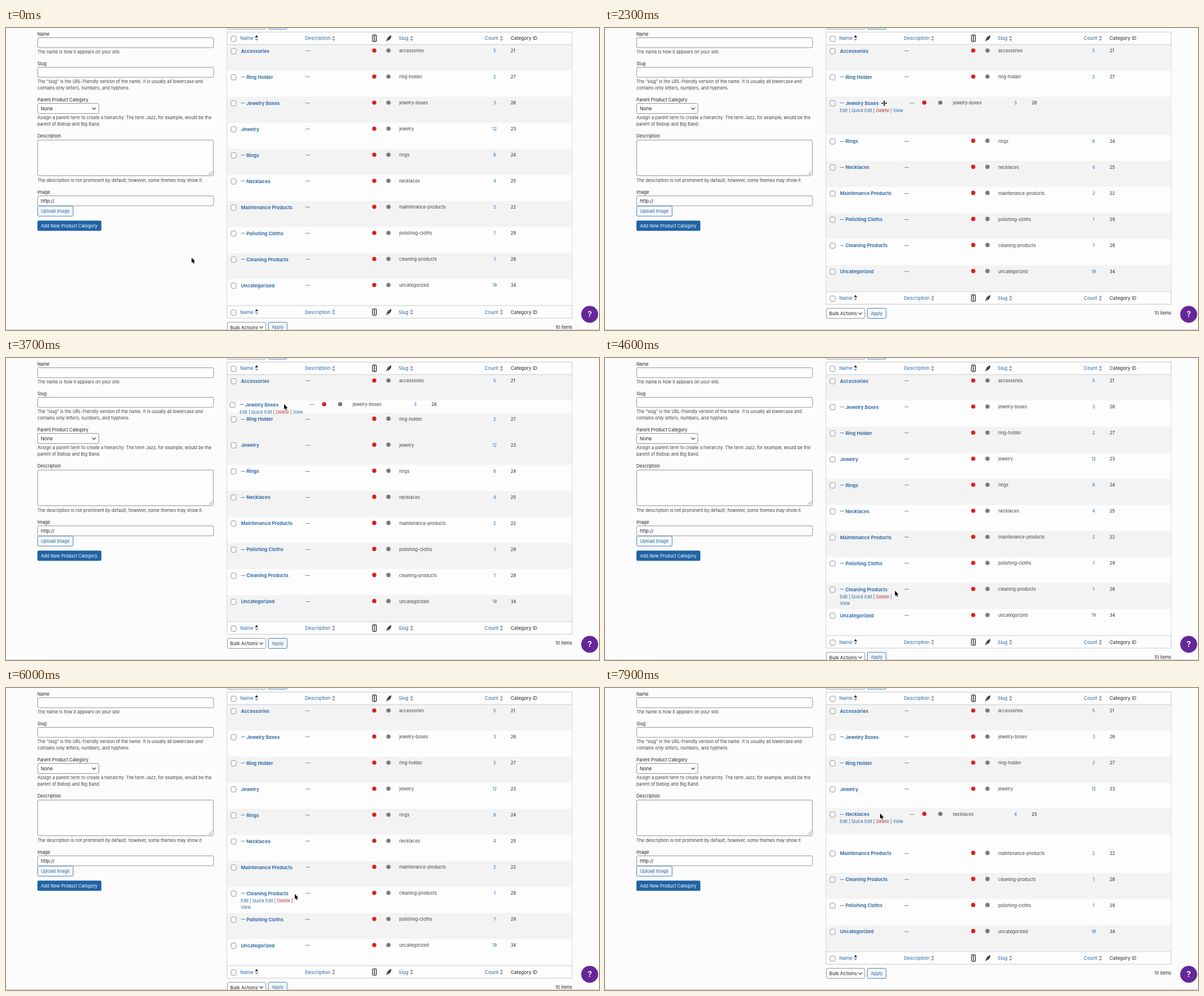
Animation, 1000 px wide and 510 px high, one loop 8 s. Source, as an HTML page:

```html
<!DOCTYPE html>
<html lang="en">
<head>
<meta charset="utf-8">
<title>Category ordering</title>
<style>
html, body { margin: 0; width: 100%; height: 100%; overflow: hidden; background: #fcfcfc; }
svg { display: block; width: 1000px; height: 510px; }
text { font: 7.35px Inter, "Open Sans", sans-serif; fill: #414143; white-space: pre; }
.big { font-size: 8px; }
.bold { font-size: 8px; font-weight: 600; fill: #215f9f; }
.dash { font-size: 6.8px; }
.link { fill: #2468a8; }
.dark { fill: #202022; }
.del { fill: #b03232; }
.mid { text-anchor: middle; }
.end { text-anchor: end; }
.box { fill: #fefefe; stroke: #8c8d94; stroke-width: .9; }
.btn { fill: #f6f7f8; stroke: #3a78b0; stroke-width: .9; }
</style>
</head>
<body>
<svg viewBox="0 0 1000 510" xmlns="http://www.w3.org/2000/svg">
  <g id="form"></g>
  <g id="table"></g>
  <g id="help">
    <circle cx="984.3" cy="483.5" r="14.3" fill="#63279a"/>
    <text x="984.3" y="488.4" class="mid" style="font-size:13.5px;font-weight:600;fill:#fff">?</text>
  </g>
  <g id="pointer"></g>
</svg>
<script>
const LOOP = 8000, STEP = 100, LAG = 90;
const TOP = 28, ROW = 44, GAP = 20.4;
const STRIPE = '#f3f3f4', PLAIN = '#fdfdfd', EDGE = '#c6c7ce', INK = '#1c1c1e';

// name, slug, count, id, is child
const items = [
  ['Accessories', 'accessories', 5, 21, 0],
  ['Ring Holder', 'ring-holder', 2, 27, 1],
  ['Jewelry Boxes', 'jewelry-boxes', 3, 26, 1],
  ['Jewelry', 'jewelry', 12, 23, 0],
  ['Rings', 'rings', 8, 24, 1],
  ['Necklaces', 'necklaces', 4, 25, 1],
  ['Maintenance Products', 'maintenance-products', 2, 22, 0],
  ['Polishing Cloths', 'polishing-cloths', 1, 29, 1],
  ['Cleaning Products', 'cleaning-products', 1, 28, 1],
  ['Uncategorized', 'uncategorized', 19, 34, 0]
];

// Each drag lifts the row at a position and drops it one place higher.
const drags = [
  { at: 2, from: 2300, to: 3800 },
  { at: 8, from: 4900, to: 5700 },
  { at: 5, from: 6850, to: 9000 }
];

// time, x, y
const path = [
  [0, 313, 389], [500, 313, 389], [1200, 430, 153], [1500, 430, 153],
  [2000, 471, 127], [2300, 471, 127], [3000, 469, 79], [3900, 469, 79],
  [4500, 489, 394], [4900, 489, 394], [5400, 487, 349], [6200, 487, 349],
  [6700, 464, 258.5], [6900, 464, 258.5], [7800, 464, 213], [8000, 464, 213]
];

const fixedCols = { dash: 505, red: 621, grey: 645, slug: 663, count: 824, id: 851 };
const dragCols = { dash: 514, red: 538.5, grey: 565.5, slug: 586.5, count: 692, id: 719.5 };

const put = (id, html) => { document.getElementById(id).innerHTML = html; };
const text = (x, y, s, cls = '') => `<text x="${x}" y="${y}" class="${cls}">${s}</text>`;
const rect = (x, y, w, h, attrs) => `<rect x="${x}" y="${y}" width="${w}" height="${h}" ${attrs}/>`;
const box = (x, y, w, h, cls = 'box', r = 2) => rect(x, y, w, h, `rx="${r}" class="${cls}"`);
const dot = (x, y, r, fill) => `<circle cx="${x}" cy="${y}" r="${r}" fill="${fill}"/>`;
const line = (d, color, w = 1) => `<path d="${d}" fill="none" stroke="${color}" stroke-width="${w}"/>`;
const check = y => box(379.5, y - 4.5, 8.6, 9, 'box', 2.2);
const chevron = (x, y) => line(`M${x - 3} ${y - 1.5}l3 3 3-3`, '#424246', 1.2);

function drawForm() {
  const labels = [[12.7, 'Name'], [62.5, 'Slug'], [123.7, 'Parent Product Category'],
    [184.7, 'Description'], [279.9, 'Image']];
  const hints = [
    [43.3, 'The name is how it appears on your site.'],
    [93.2, 'The “slug” is the URL-friendly version of the name. It is usually all lowercase and'],
    [104.2, 'contains only letters, numbers, and hyphens.'],
    [154.2, 'Assign a parent term to create a hierarchy. The term Jazz, for example, would be the'],
    [165.1, 'parent of Bebop and Big Band.'],
    [260.3, 'The description is not prominent by default; however, some themes may show it.']
  ];
  put('form',
    labels.map(([y, s]) => text(53, y, s, 'dark')).join('') +
    hints.map(([y, s]) => text(53, y, s)).join('') +
    box(53.4, 16.4, 296.6, 16.8) + box(53.4, 66.4, 296.6, 16.8) +
    box(53.4, 127.4, 103.2, 17) + text(58.8, 139, 'None', 'big dark') + chevron(148.5, 136) +
    box(53.4, 189.2, 296.2, 60.3) + line('M341.5 248l6.5-6.5M345 248l3-3', '#6c6c70', .8) +
    box(53.4, 283.5, 296.6, 16.7) + text(58.8, 295, 'http://', 'big dark') +
    box(53.4, 300.8, 59.8, 17, 'btn') + text(59, 312.2, 'Upload Image', 'link') +
    rect(53, 325.3, 107.8, 17.2, 'rx="2" fill="#2063a5"') +
    `<text x="59" y="336.8" style="fill:#fff">Add New Product Category</text>` +
    line('M0 509.5H1000', '#d0d0d4'));
}

const sorter = (x, y, up = '#9a9aa0') =>
  `<path d="M${x - 2.7} ${y - 1}l2.7-3.8 2.7 3.8z" fill="${up}"/>` +
  `<path d="M${x - 2.7} ${y + 1}l2.7 3.8 2.7-3.8z" fill="#9a9aa0"/>`;

function heading(y) {
  const base = y + 2.8;
  return check(y + .8) +
    text(395, base, 'Name', 'big link') + sorter(422.5, y - .6, INK) +
    text(504, base, 'Description', 'big link') + sorter(552.5, y) +
    rect(618, y - 5.6, 6.6, 11, `rx="1.6" fill="none" stroke="${INK}" stroke-width="1.1"`) +
    [-3, 0, 3].map(d => dot(621.3, y + d - .1, 1.1, INK)).join('') +
    `<path d="M641.3 ${y + 5.3}c.6-4 2.6-8.6 8.3-10.3 .2 3.6-1.8 7.6-6 8.4z" fill="${INK}"/>` +
    line(`M642.5 ${y + 3.5}q2.5-4.2 5.4-6.3`, '#fff', .7) +
    text(662, base, 'Slug', 'big link') + sorter(684, y) +
    text(830, base, 'Count', 'big link end') + sorter(835.5, y) +
    text(851, base, 'Category ID', 'big dark');
}

function actions(y, oneLine) {
  const bar = x => text(x, y, '|');
  return text(396, y, 'Edit', 'link') + bar(411) + text(415.5, y, 'Quick Edit', 'link') +
    bar(452.6) + text(457, y, 'Delete', 'del') + bar(481.6) +
    (oneLine ? text(485.8, y, 'View', 'link') : text(396, y + 11.2, 'View', 'link'));
}

function rowContent(item, y, cols, hover) {
  const [name, slug, count, id, child] = item;
  const base = y + 13.2;
  return check(y + 11.2) +
    (child ? text(396.2, base, '—', 'bold dash') : '') +
    text(child ? 405.4 : 396.2, y + 13.6, name, 'bold') +
    text(cols.dash, base, '—') +
    dot(cols.red, y + 10, 3.6, '#d92222') + dot(cols.grey, y + 10, 3.6, '#7a7a7c') +
    text(cols.slug, base, slug) + text(cols.count, base, count, 'link mid') +
    text(cols.id, base, id, 'dark') +
    (hover ? actions(y + 25.9, cols === dragCols) : '');
}

const ease = p => p * p * (3 - 2 * p);

function cursorAt(t) {
  const i = Math.max(1, path.findIndex(k => k[0] >= t));
  const [t0, x0, y0] = path[i - 1], [t1, x1, y1] = path[i];
  const p = ease((t - t0) / (t1 - t0));
  return { x: x0 + (x1 - x0) * p, y: y0 + (y1 - y0) * p };
}

function listAt(t) {
  const list = [...items];
  for (const d of drags) {
    if (t >= d.to) list.splice(d.at - 1, 0, list.splice(d.at, 1)[0]);
  }
  return list;
}

function drawTable(t, cur, drag) {
  const list = listAt(t);
  const lifted = drag && list[drag.at];
  let move = { x: 0, y: 0 };
  if (drag) {
    const start = cursorAt(drag.from);
    const now = cursorAt(Math.max(drag.from, t - LAG));
    move = { x: now.x - start.x, y: now.y - start.y };
    // null marks the placeholder
    list.splice(move.y < -20 ? drag.at - 1 : drag.at + 1, 0, null);
  }

  let y = TOP, fills = '', rows = '', liftedFill = 'none';
  list.forEach((item, i) => {
    const fill = i % 2 ? PLAIN : STRIPE;
    if (item && item === lifted) {
      liftedFill = i % 2 ? 'none' : STRIPE;
      return;
    }
    const h = item ? ROW : GAP;
    fills += rect(373, y, 581.5, h, `fill="${fill}"`);
    if (item) {
      const hover = !drag && cur.x > 373 && cur.x < 954 && cur.y >= y && cur.y < y + h;
      rows += rowContent(item, y, fixedCols, hover);
    }
    y += h;
  });

  let top = '';
  if (drag) {
    const rowY = TOP + drag.at * ROW + move.y;
    top = `<g transform="translate(${move.x} 0)">` +
      rect(373, rowY, 581.5, ROW, `fill="${liftedFill}"`) +
      rowContent(lifted, rowY, dragCols, true) + '</g>';
  }

  put('table',
    box(373.4, -15, 64.6, 17) + box(442.4, -15, 31.6, 17, 'btn') +
    rect(372.8, 7, 582, y + 15, `fill="${PLAIN}" stroke="${EDGE}" stroke-width=".9"`) +
    fills + line(`M373 28H954.5M373 ${y + .8}H954.5`, EDGE, .9) +
    heading(17.5) + heading(y + 11.8) + rows +
    box(373.4, y + 29, 64.6, 17) + text(378, y + 40.6, 'Bulk Actions', 'big dark') +
    chevron(430.5, y + 37.7) +
    box(442.4, y + 29, 31.6, 17, 'btn') + text(458.2, y + 40.4, 'Apply', 'link mid') +
    text(955, y + 39.9, '10 items', 'dark end') + top);
}

function drawPointer({ x, y }, moving) {
  const arrow = 'M0-1v8.6l1.9-1.7 1.4 3.1 1.5-.7-1.4-3h2.6z';
  const cross = 'M0-4.8l1.8 2H.6V-.6h2.2v-1.2l2 1.8-2 1.8V.6H.6v2.2h1.2L0 4.8l-1.8-2h1.2V.6h-2.2v1.2l-2-1.8 2-1.8v1.2h2.2v-2.2h-1.2z';
  put('pointer', `<path transform="translate(${x} ${y})" d="${moving ? cross : arrow}"
    fill="#000" stroke="#fff" stroke-width=".9" paint-order="stroke"/>`);
}

let last = -1;
function update(now) {
  const t = Math.floor((now % LOOP) / STEP) * STEP;
  if (t !== last) {
    last = t;
    const cur = cursorAt(t);
    const drag = drags.find(d => t >= d.from && t < d.to);
    drawTable(t, cur, drag);
    drawPointer(cur, drag && t < drag.from + 500);
  }
  requestAnimationFrame(update);
}

drawForm();
update(0);
</script>
</body>
</html>
```
